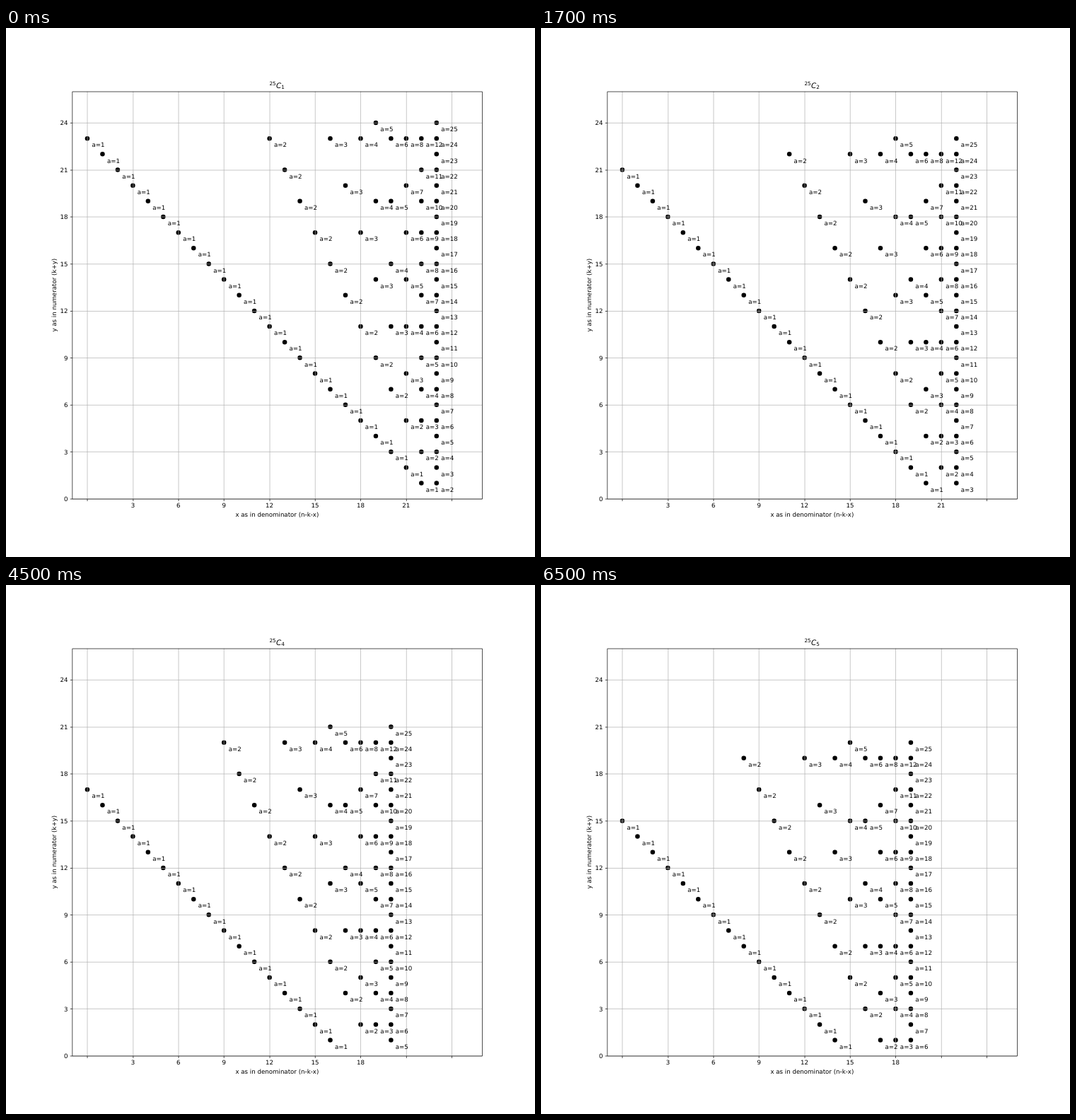
An HTML page for the animation above (8 s loop, 748x748 px).

```html
<!DOCTYPE html>
<html lang="en">
<head>
<meta charset="utf-8">
<title>Integer ratios in binomial terms</title>
<style>
  html, body { margin: 0; width: 100%; height: 100%; overflow: hidden; background: #fff; }
  svg { display: block; width: 100vw; height: 100vh; }
  text { font-family: "DejaVu Sans", sans-serif; font-size: 13.89px; text-rendering: geometricPrecision; }
  .title { font-size: 16.67px; }
  .script { font-size: 11.67px; }
  .line { fill: none; stroke: #000; stroke-width: 1.11; }
  .grid { stroke: #b0b0b0; }
</style>
</head>
<body>
<svg id="plot" viewBox="0 0 1200 1200"></svg>
<script>
const N = 25, LOOP = 8000, STEP = 2000, LEAD = 1500;
const LEFT = 150, RIGHT = 1080, TOP = 144, BOTTOM = 1068;
const DX = (RIGHT - LEFT) / 27, DY = (BOTTOM - TOP) / 26;
const TICK = 4.86, DOT = 5.21;

const px = x => LEFT + (x + 1) * DX;
const py = y => BOTTOM - y * DY;
const snap = v => Math.round(v) + 0.5;

function add(parent, tag, attrs = {}, text = "") {
  const el = document.createElementNS("http://www.w3.org/2000/svg", tag);
  for (const key in attrs) el.setAttribute(key, attrs[key]);
  el.textContent = text;
  parent.appendChild(el);
  return el;
}

const svg = document.getElementById("plot");
const dots = add(svg, "g");
const axes = add(svg, "g");
const labels = add(svg, "g");
const line = (d, cls = "") => add(axes, "path", { d, class: "line " + cls });
const xTicks = [];

for (let v = 0; v <= 24; v += 3) {
  const x = snap(px(v)), y = snap(py(v));
  line(`M${x} ${TOP}V${BOTTOM}`, "grid");
  line(`M${LEFT} ${y}H${RIGHT}`, "grid");
  line(`M${x} ${BOTTOM + 0.5}v${TICK}M${LEFT + 0.5} ${y}h${-TICK}`);
  xTicks.push({ v, el: add(axes, "text", { x: px(v), y: 1088.3, "text-anchor": "middle" }) });
  add(axes, "text", { x: LEFT - 9.72, y: py(v) + 5.28, "text-anchor": "end" }, v);
}
line(`M${LEFT + 0.5} ${TOP + 0.5}H${RIGHT + 0.5}V${BOTTOM + 0.5}H${LEFT + 0.5}Z`);

add(axes, "text", { x: 615, y: 1107.8, "text-anchor": "middle" }, "x as in denominator (n-k-x)");
add(axes, "text", { transform: "translate(113.8 606) rotate(-90)", "text-anchor": "middle" },
  "y as in numerator (k+y)");
add(axes, "text", { x: 597.6, y: 129.3, class: "script" }, N);
add(axes, "text", { x: 612.9, y: 135.7, class: "title", "font-style": "italic" }, "C");
const sub = add(axes, "text", { x: 624.6, y: 138.4, class: "script" });

// Mark every point where a = (k + y) / (n - k - x) is a whole number.
function draw(k) {
  dots.replaceChildren();
  labels.replaceChildren();
  sub.textContent = k;
  for (const { v, el } of xTicks) el.textContent = v > 0 && v < N - k && v < 24 ? v : "";
  for (let d = 1; d <= N - k; d++) {
    for (let a = 1; a * d <= N; a++) {
      const x = N - k - d, y = a * d - k;
      if (y < 1) continue;
      add(dots, "circle", { cx: px(x), cy: py(y), r: DOT });
      add(labels, "text", { x: px(x + 0.3), y: py(y - 0.55) }, "a=" + a);
    }
  }
}

let shown = 0;
function frame() {
  const t = performance.now() % LOOP;
  const k = 1 + Math.floor((t + LEAD) / STEP);
  if (k !== shown) draw(shown = k);
  requestAnimationFrame(frame);
}
frame();
</script>
</body>
</html>
```
